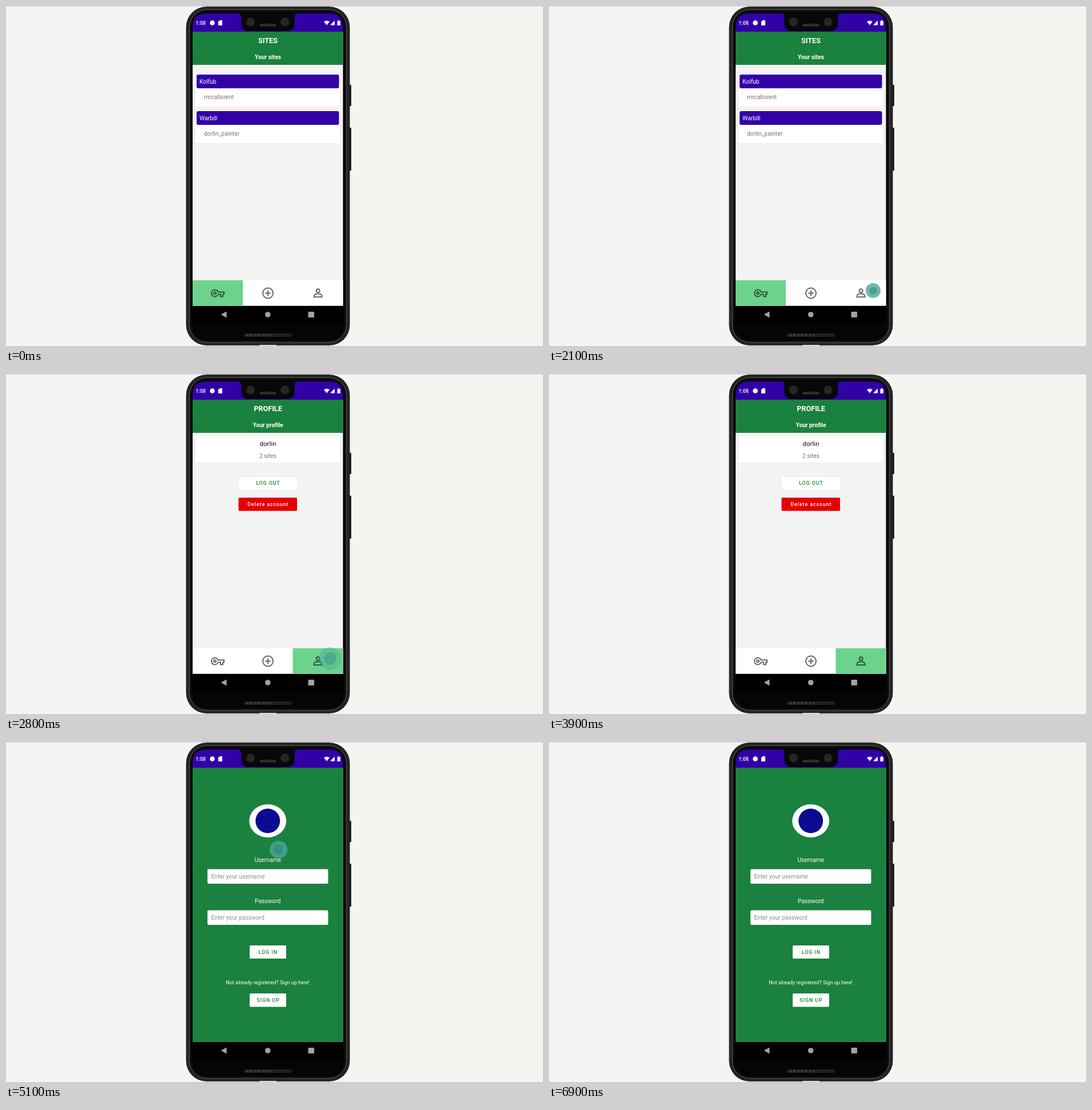
These frames come from a looping animation (941 px wide and 595 px high, 7500 ms). An HTML page:

```html
<!DOCTYPE html>
<html lang="en">
<head>
<meta charset="utf-8">
<title>Password keeper demo</title>
<style>
  html, body { margin: 0; width: 100%; height: 100%; overflow: hidden; background: #f4f4f4; }
  svg { display: block; width: 100%; height: 100%; }
  text { font: 10.25px Roboto, Arial, sans-serif; fill: #fff; }
  .mid { text-anchor: middle; }
  .title { font-weight: 700; font-size: 12.7px; }
  .sub { font-weight: 700; font-size: 10.2px; }
  .btn { font-weight: 500; font-size: 8.9px; letter-spacing: .9px; text-anchor: middle; }
  .green { fill: #1b813e; }
  .grey { fill: #747474; }
  .hint { fill: #8e8e8e; }
  .card { fill: #fffffd; filter: drop-shadow(0 .7px .7px #0003); }
  .raised { filter: drop-shadow(0 2px 2.5px #0007); }
  .icon { fill: #000; opacity: .6; }
</style>
</head>
<body>
<svg viewBox="0 0 941 595">
  <defs>
    <clipPath id="display"><path d="M327 37Q327 13 351 13H567Q590.5 13 590.5 37V542Q590.5 555 577 555H340Q327 555 327 542Z"/></clipPath>
    <g id="camera">
      <circle r="8" fill="#202020"/><circle r="5" fill="#2d2d2d"/><circle r="2" fill="#161616"/>
    </g>
  </defs>

  <rect width="941" height="595" fill="#f4f4f4"/>
  <rect x="459" width="482" height="595" fill="#f4f5f0"/>
  <rect width="941" height="1" fill="#dadcdb"/>

  <!-- phone body -->
  <path d="M601 138h4v37h-4zM601 213h4v75h-4z" fill="#202020"/>
  <rect x="315.5" y="1" width="287" height="593" rx="36" fill="#181818"/>
  <rect x="317.5" y="3" width="283" height="589" rx="34" fill="none" stroke="#383838"/>
  <rect x="321" y="6" width="276" height="583" rx="31" fill="#080808" stroke="#727272"/>
  <rect x="323.5" y="8.5" width="271" height="578" rx="29" fill="#050505" stroke="#1d1d1d"/>
  <rect x="444" y="593" width="30" height="1" fill="#bbb"/>
  <rect x="417" y="573" width="84" height="6" rx="2" fill="#202020"/>
  <path d="M421 576H465" stroke="#383838" stroke-width="4" stroke-dasharray="4 3"/>

  <g clip-path="url(#display)">
    <rect x="327" y="13" width="264" height="542"/>
    <rect x="327" y="13" width="264" height="32" fill="#3300a8"/>
    <rect x="327" y="45" width="264" height="479.5" fill="#f3f3f3"/>

    <g id="home">
      <rect class="green" x="327" y="45" width="264" height="58"/>
      <text class="mid title" id="title" x="459" y="64.5"></text>
      <text class="mid sub" id="subtitle" x="459" y="92.5"></text>
      <g id="sites"></g>
      <g id="profile">
        <rect class="card" x="332" y="108" width="253.5" height="47.5" rx="1"/>
        <text class="mid" x="459" y="125.5" style="font-size:11.6px;fill:#111">dorlin</text>
        <text class="mid grey" x="459" y="146.5">2 sites</text>
        <rect class="card" id="logout" x="407.5" y="179.5" width="102.5" height="22.5" rx="1.5"/>
        <text class="btn green" x="459.4" y="194">LOG OUT</text>
        <rect class="card" x="407.5" y="216.5" width="102.5" height="23" rx="1.5" style="fill:#e60000"/>
        <text class="btn" x="459.4" y="231.2">Delete account</text>
      </g>
      <rect x="327" y="480" width="264" height="44.5" fill="#fff"/>
      <rect id="tab" y="480" width="88" height="44.5" fill="#6dd28c"/>
      <path class="icon" transform="translate(359 490.5)" d="M22 19h-6v-4h-2.7a7 7 0 1 1 0-6H24v6h-2zm-4-2h2v-4h2v-2H11.9a5 5 0 1 0 0 2H18zM7 15a3 3 0 1 1 0-6 3 3 0 0 1 0 6zm0-4a1 1 0 1 0 0 2 1 1 0 0 0 0-2z"/>
      <g fill="none" stroke="#000" stroke-width="2" opacity=".6">
        <path d="M459 497.5v10M454 502.5h10"/>
        <circle cx="459" cy="502.5" r="9"/>
        <circle cx="546.7" cy="498.3" r="3"/>
        <path d="M539.7 509.3v-2q1-3.7 7-3.7t7 3.7v2z"/>
      </g>
    </g>

    <g id="login">
      <rect class="green" x="327" y="45" width="264" height="479.5"/>
      <ellipse cx="458.7" cy="138" rx="32.5" ry="29" fill="#fff"/>
      <circle cx="458.7" cy="138" r="21.5" fill="#0a0a92"/>
      <text class="mid" x="458.7" y="210">Username</text>
      <rect x="353" y="222.5" width="211.5" height="25.5" rx="2" fill="#fff"/>
      <text class="hint" x="359.5" y="239">Enter your username</text>
      <text class="mid" x="458.7" y="281.7">Password</text>
      <rect x="353" y="294.5" width="211.5" height="25.5" rx="2" fill="#fff"/>
      <text class="hint" x="359.5" y="311">Enter your password</text>
      <rect class="card" x="427" y="356" width="64" height="23" rx="1.5"/>
      <text class="btn green" x="459.4" y="370.7">LOG IN</text>
      <text class="mid" x="458.5" y="424" style="font-size:9px">Not already registered? Sign up here!</text>
      <rect class="card" x="427" y="440" width="64" height="23.5" rx="1.5"/>
      <text class="btn green" x="459.4" y="455.2">SIGN UP</text>
    </g>

    <!-- status bar -->
    <text x="332.3" y="32.7" style="font-size:8.9px;font-weight:500">1:08</text>
    <g fill="#fff">
      <circle cx="361.5" cy="29.5" r="4.3"/>
      <path d="M374.5 25H379v9h-7v-6.5z"/>
      <path d="M557 27.5q5-3.5 10 0l-5 6z"/>
      <path d="M576 25.5v8h-8z"/>
      <path d="M580.5 26.2h1.6V25h2v1.2h1.7V34h-5.3z"/>
    </g>
    <path d="M408 13Q412 13 412 19V30Q412 44 426 44H492Q506 44 506 30V19Q506 13 510 13Z" fill="#080808"/>

    <!-- system navigation -->
    <g fill="#a2a2a2">
      <path d="M386.5 534.5v11l-10-5.5z"/>
      <circle cx="458.7" cy="540" r="4.8"/>
      <rect x="529.5" y="535" width="10.5" height="10" rx="1"/>
    </g>
  </g>

  <use href="#camera" x="428.5" y="28"/>
  <use href="#camera" x="489" y="28"/>
  <rect x="444" y="31" width="30" height="5" rx="2" fill="#2b2b2b"/>

  <g id="touch">
    <circle id="ring" fill="#4aa898"/>
    <circle id="core" fill="#2f7f78"/>
  </g>
</svg>
<script>
const $ = id => document.getElementById(id);
const LOOP = 7500, TICK = 100, PRESS = 400, FADE = 1000;
const taps = [{ at: 1700, x: 568, y: 498 }, { at: 4600, x: 477.5, y: 188.3 }];

const siteCard = ([site, user], i) => {
  const y = 120 + 64 * i;
  return `<rect class="card" x="332" y="${y + 24}" width="253.5" height="32.5" rx="1"/>
    <rect x="334" y="${y}" width="249.5" height="24" rx="3" fill="#3300a8"/>
    <text x="339" y="${y + 16}">${site}</text>
    <text class="grey" x="347" y="${y + 42.7}">${user}</text>`;
};
$('sites').innerHTML = [['Kolfub', 'mrcallorent'], ['Warbill', 'dorlin_painter']].map(siteCard).join('');

const show = (id, on) => $(id).style.display = on ? '' : 'none';

function dot(id, r, opacity) {
  $(id).setAttribute('r', r);
  $(id).setAttribute('opacity', opacity);
}

function drawTouch(t) {
  const tap = taps.find(p => t >= p.at && t < p.at + PRESS + FADE);
  show('touch', tap);
  if (!tap) return;
  const age = t - tap.at;
  const press = Math.min(age / PRESS, 1);
  const fade = Math.max(age - PRESS, 0) / FADE;
  const spread = Math.sqrt(fade);
  $('touch').setAttribute('transform', `translate(${tap.x} ${tap.y})`);
  dot('ring', 27 - 14 * press + 8 * spread, (.1 + .7 * press) * (1 - fade ** 2));
  dot('core', 6.5 + 5.4 * spread, .5 * press * (1 - fade ** 3));
}

function draw(now) {
  const t = Math.floor(now % LOOP / TICK) * TICK;
  const profile = t >= 2200, login = t >= 5100;
  show('home', !login);
  show('login', login);
  show('sites', !profile);
  show('profile', profile);
  $('title').textContent = profile ? 'PROFILE' : 'SITES';
  $('subtitle').textContent = profile ? 'Your profile' : 'Your sites';
  $('tab').setAttribute('x', profile ? 502.5 : 327);
  $('logout').classList.toggle('raised', t >= 4900);
  drawTouch(t);
}

const start = performance.now();
function loop() {
  draw(performance.now() - start);
  requestAnimationFrame(loop);
}
loop();
</script>
</body>
</html>
```
